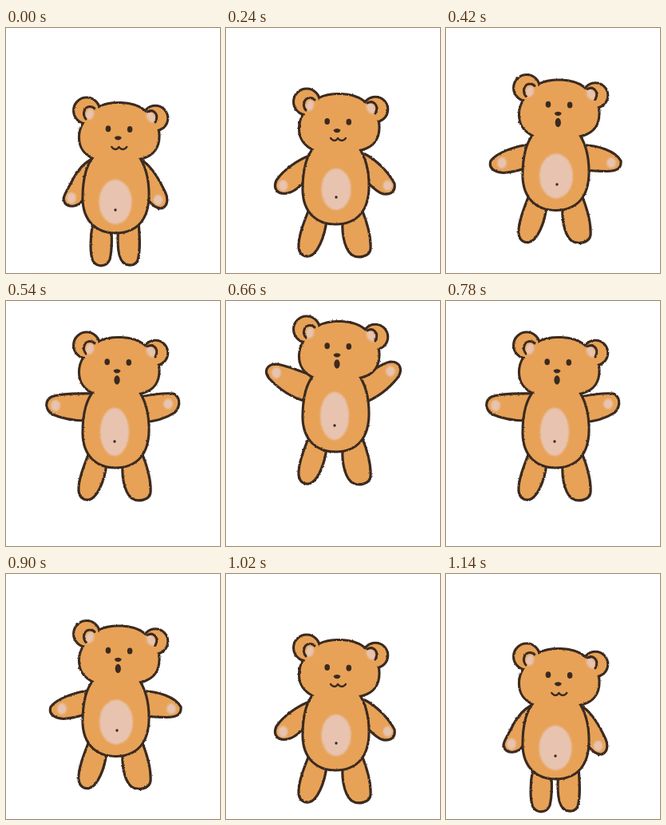
An HTML page for the animation above (1320 ms loop, 268x307 px).

```html
<!DOCTYPE html>
<html lang="en">
<head>
<meta charset="utf-8">
<title>Jumping bear</title>
<style>
  html, body { margin: 0; width: 100%; height: 100%; overflow: hidden; background: #fff; }
  svg { display: block; width: 100vw; height: 100vh; }
  .pose { visibility: hidden; animation: 1320ms step-end infinite; }
  .stand { animation-name: stand; }
  .push { animation-name: push; }
  .rise { animation-name: rise; }
  .high { animation-name: high; }
  .peak { animation-name: peak; }
  @keyframes stand { 0%, 86.363% { visibility: visible } 18.181%, 100% { visibility: hidden } }
  @keyframes push { 0%, 31.818%, 86.363%, 100% { visibility: hidden } 18.181%, 77.272% { visibility: visible } }
  @keyframes rise { 0%, 40.909%, 77.272%, 100% { visibility: hidden } 31.818%, 68.181% { visibility: visible } }
  @keyframes high { 0%, 50%, 68.181%, 100% { visibility: hidden } 40.909%, 59.09% { visibility: visible } }
  @keyframes peak { 0%, 59.09%, 100% { visibility: hidden } 50% { visibility: visible } }

  .limb { fill: #e7a257; stroke: #3a2a20; stroke-width: 3.2; }
  .edge { fill: none; stroke: #3a2a20; stroke-width: 6.2; }
  .fill { fill: #e7a257; }
  .line { fill: none; stroke: #3a2a20; stroke-width: 3; }
  .thin { fill: none; stroke: #3a2a20; stroke-width: 2.3; }
  .ink { fill: #3a2a20; }
  .pink { fill: #e8c4b0; filter: url(#soft); }
  path { stroke-linecap: round; stroke-linejoin: round; }
</style>
</head>
<body>
<svg id="stage" viewBox="0 0 268 307">
  <defs>
    <filter id="soft" x="-30%" y="-30%" width="160%" height="160%" color-interpolation-filters="sRGB">
      <feGaussianBlur stdDeviation="1"/>
    </filter>
    <filter id="rough" filterUnits="userSpaceOnUse" x="0" y="0" width="268" height="307" color-interpolation-filters="sRGB">
      <feTurbulence type="fractalNoise" baseFrequency=".4" numOctaves="2" seed="4"/>
      <feDisplacementMap in="SourceGraphic" scale="2.2" xChannelSelector="R" yChannelSelector="G"/>
    </filter>
  </defs>
</svg>
<script>
const path = (cls, d) => `<path class="${cls}" d="${d}"/>`;
const oval = (cls, x, y, rx, ry = rx, turn = 0) =>
  `<ellipse class="${cls}" cx="${x}" cy="${y}" rx="${rx}" ry="${ry}" transform="rotate(${turn} ${x} ${y})"/>`;

const head = 'M117 52C130 45 158 45 171 55C183 63 190.5 74 190.5 87C190.5 102 184 110 171 114C150 120 125 120 111 115C98 109 93 101 93 89C93 77 99 65 117 52Z';
const body = 'M112 113C101 124 97.5 145 97.5 166C98 193 114 207.5 137 207.5C164 207.5 177.5 190 177.5 161C177.5 141 173 124 164 112Z';

const legs = {
  together: [
    'M109 195C105 215 105 235 109 244C114 252 126 252 130 242C133 230 133 210 131 198',
    'M141 198C139 220 140 240 147 246C153 251 162 250 165 243C169 228 167 210 166 195'
  ],
  apart: [
    'M104 190C98 205 90 225 91 238C92 247 98 250 104 249C114 247 124 225 126 203',
    'M147 200C144 215 147 238 157 247C166 253 180 249 181 240C182 225 176 205 170 190'
  ]
};

// dy lifts the whole bear; look shifts eyes and nose on the head.
const poses = [
  { name: 'stand', dy: 48, dx: 1.3, look: 2, legs: 'together', smile: true,
    belly: [137, 170, 20.5, 28], navel: [137, 180], paws: [82, 165, 190.5, 167.5],
    arms: ['M106 117C97 122 90 130 84 141C80 150 73 159 72 166C73 174 79 176 85 175C93 174 97 168 100 160',
           'M172 119C185 128 194 146 200 159C204 169 201 177 194 178C186 178 179 170 172 160'] },
  { name: 'push', dy: 37, dx: 0, look: 3.7, legs: 'apart', smile: true,
    belly: [138, 165, 18.5, 26], navel: [138, 175], paws: [71.5, 160.5, 202.5, 160.5],
    arms: ['M107 122C89 128 71 142 63 154C59 163 63 170.5 73 170.5C85 170 95 160 100 152',
           'M174 121C188 128 204 144 211 158C212.5 168 207 172 197 171C189 169 182 161 176 155'] },
  { name: 'rise', dy: 19.5, dx: 1.3, look: 0, legs: 'apart',
    belly: [138, 166, 21, 28], navel: [139, 176.5], paws: [70, 149.5, 207, 149.5],
    arms: ['M108 126C88 128 64 136 56 147C53 156 60 161 72 162C84 161 92 159 100 156',
           'M172 127C190 128 212 134 219 147C220 157 213 160 202 160C190 160 183 160 174 158'] },
  { name: 'high', dy: 0, dx: 0, look: 0, legs: 'apart',
    belly: [136, 164, 18, 30], navel: [136, 176], paws: [62, 131, 203, 129],
    arms: ['M115 116C95 116 72 115 57 120C48 125 49 136 58 142C72 148 86 150 100 150',
           'M168 120C184 117 198 115 209 116C219 120 219 132 211 140C200 147 186 151 172 152'] },
  { name: 'peak', dy: -20, dx: 0, look: 0, legs: 'apart',
    belly: [136, 164, 18, 30], navel: [136, 176], paws: [63, 110, 206, 108],
    arms: ['M112 114C95 110 76 100 63 99C51 99 47 108 54 117C66 130 83 141 100 146',
           'M168 116C182 109 194 98 206 96C218 96 222 106 215 116C204 130 190 141 172 148'] }
];

function torso(cls) {
  return path(cls, body) + path(cls, head) + oval(cls, 101, 55.5, 14.9) + oval(cls, 187, 65, 14.2);
}

function ears() {
  return oval('pink', 105, 60, 5, 7, 15) + oval('pink', 181.5, 63.5, 5, 7.5, -30) +
    path('line', 'M100 66C95 60 98 50.5 105 50.5Q109 50.5 111 53') +
    path('line', 'M177 57C184 53 190 59 188.5 66L187 70');
}

function face(p) {
  const mouth = p.smile
    ? path('thin', 'M131 101C134 105 138 105 140 101C143 105 147 105 150 101')
    : oval('ink', 139, 99, 3.6, 5.8);
  return `<g transform="translate(${p.dx} ${p.look})">` +
    oval('ink', 126.7, 76.3, 3.3, 4) + oval('ink', 153.8, 77, 3.3, 4) +
    path('ink', 'M134.5 87Q139 83.5 143.5 87Q142.5 90.5 139 90.5Q135.5 90.5 134.5 87') +
    `</g><g transform="translate(${p.dx})">${mouth}</g>`;
}

function bear(p) {
  const [lx, ly, rx, ry] = p.paws;
  const shift = `transform="translate(0 ${p.dy})"`;
  return `<g class="pose ${p.name}"><g filter="url(#rough)"><g ${shift}>` +
    [...legs[p.legs], ...p.arms].map(d => path('limb', d)).join('') +
    oval('pink', lx, ly, 5.8, 7) + oval('pink', rx, ry, 5.8, 6.5) +
    torso('edge') + torso('fill') + ears() + oval('pink', ...p.belly) +
    `</g></g><g ${shift}>` + oval('ink', ...p.navel, 1.7) + face(p) + '</g></g>';
}

document.getElementById('stage').insertAdjacentHTML('beforeend', poses.map(bear).join(''));
</script>
</body>
</html>
```
